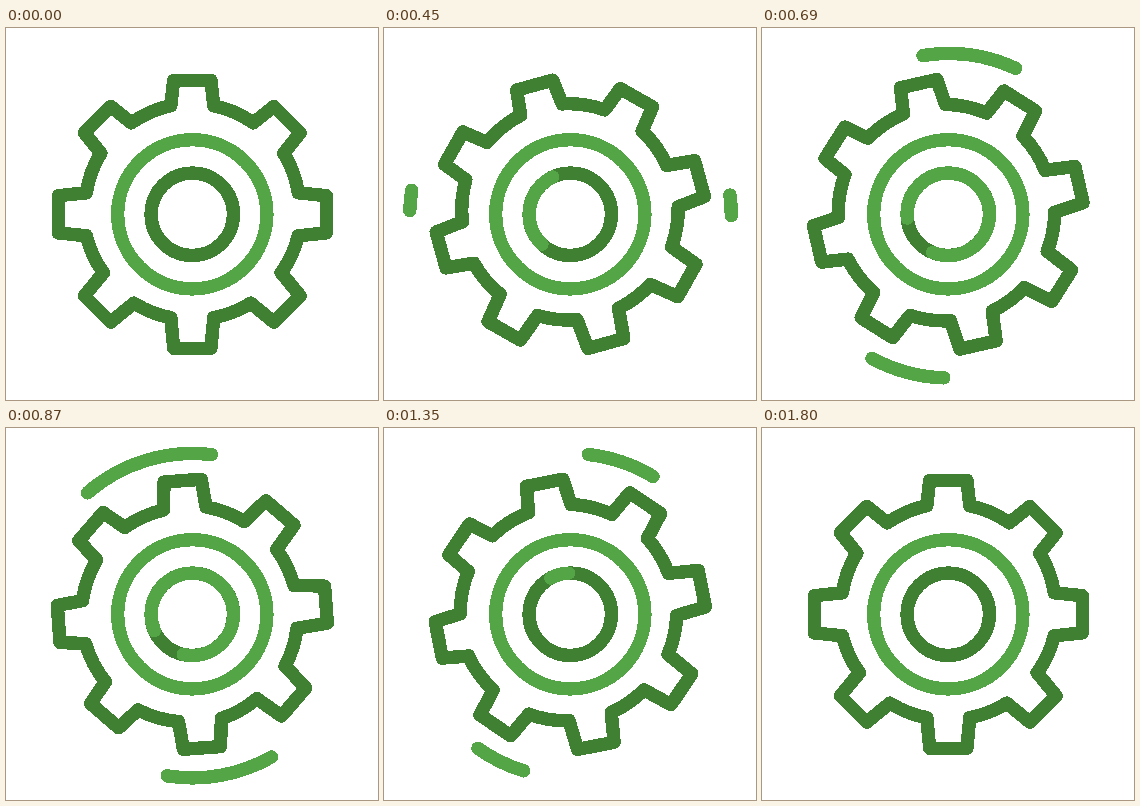
Recreate the animation shown at these times as an HTML page. Size 372 px wide and 372 px high, loop 1860 ms.

```html
<!DOCTYPE html>
<html lang="en">
<head>
<meta charset="utf-8">
<title>Gear</title>
<style>
  html, body { margin: 0; width: 100%; height: 100%; overflow: hidden; background: #fff; }
  svg { display: block; width: 100%; height: 100%; shape-rendering: crispEdges; }
  path, circle { fill: none; stroke-width: 13.4; stroke-linecap: round; stroke-linejoin: round; }
  .dark { stroke: #3f8033; }
  .light { stroke: #54a546; }
</style>
</head>
<body>
<svg viewBox="0 0 372 372">
  <path id="gear" class="dark"/>
  <circle class="light" cx="186.3" cy="186.3" r="74.6"/>
  <circle class="dark" cx="186.3" cy="186.3" r="41.2"/>
  <path id="ring" class="light"/>
  <path id="right" class="light"/>
  <path id="left" class="light"/>
</svg>
<script>
const LOOP = 1860, STEP = 30, LAST = 1800;
const CENTER = 186.3;
const TEETH = 8;
const INNER = { cx: CENTER, cy: CENTER, rx: 41.2, ry: 41.2 };
const OUTER = { cx: 186.5, cy: 187.7, rx: 160.8, ry: 162.2 };

const $ = id => document.getElementById(id);
const rad = deg => deg * Math.PI / 180;

// There and back: 0 to 1 to 0 between two times; warp moves the peak, power shapes the flanks.
function swing(t, from, to, warp, power) {
  const u = Math.min(1, Math.max(0, (t - from) / (to - from)));
  return Math.max(0, Math.sin(Math.PI * u ** warp)) ** power;
}

function gearPath() {
  let d = "";
  for (let i = 0; i <= TEETH; i++) {
    const a = rad(i * 360 / TEETH), c = Math.cos(a), s = Math.sin(a);
    const at = (x, y) => (x * c - y * s).toFixed(2) + " " + (x * s + y * c).toFixed(2);
    const root = -106 - 2.6 * c; // valleys sit slightly off centre
    d += (i ? "A108 108 0 0 1 " : "M") + at(-21.5, root);
    if (i < TEETH) d += `L${at(-18.6, -134)}L${at(18.6, -134)}L${at(21.5, root)}`;
  }
  return d + "Z";
}

// Counterclockwise stroke from tail to head, both measured in degrees from base.
function drawArc(id, { cx, cy, rx, ry }, base, tail, head) {
  const at = turn => {
    const a = rad(base - turn);
    return (cx + rx * Math.cos(a)).toFixed(2) + " " + (cy + ry * Math.sin(a)).toFixed(2);
  };
  const large = head - tail > 180 ? 1 : 0;
  $(id).setAttribute("d", head - tail > 2
    ? `M${at(tail)}A${rx} ${ry} 0 ${large} 0 ${at(head)}` : "");
}

function draw(now) {
  const t = Math.min(LAST, Math.floor(now % LOOP / STEP) * STEP);

  const spin = -108 * swing(t, 0, LAST, 1.24, 3.1);
  $("gear").setAttribute("transform", `translate(${CENTER} ${CENTER}) rotate(${spin})`);

  drawArc("ring", INNER, 270,
    178 * swing(t, 320, 1470, 0.78, 3.2),
    493 * swing(t, 320, 1470, 0.78, 2.1));

  const tail = swing(t, 460, 1540, 1, 0.6);
  const head = swing(t, 443, 1540, 1, 0.75);
  drawArc("right", OUTER, 0, 87 * tail, 137 * head);
  drawArc("left", OUTER, 189, 94 * tail, 134.5 * head);
}

$("gear").setAttribute("d", gearPath());
const start = performance.now();
function tick() {
  draw(performance.now() - start);
  requestAnimationFrame(tick);
}
tick();
</script>
</body>
</html>
```
